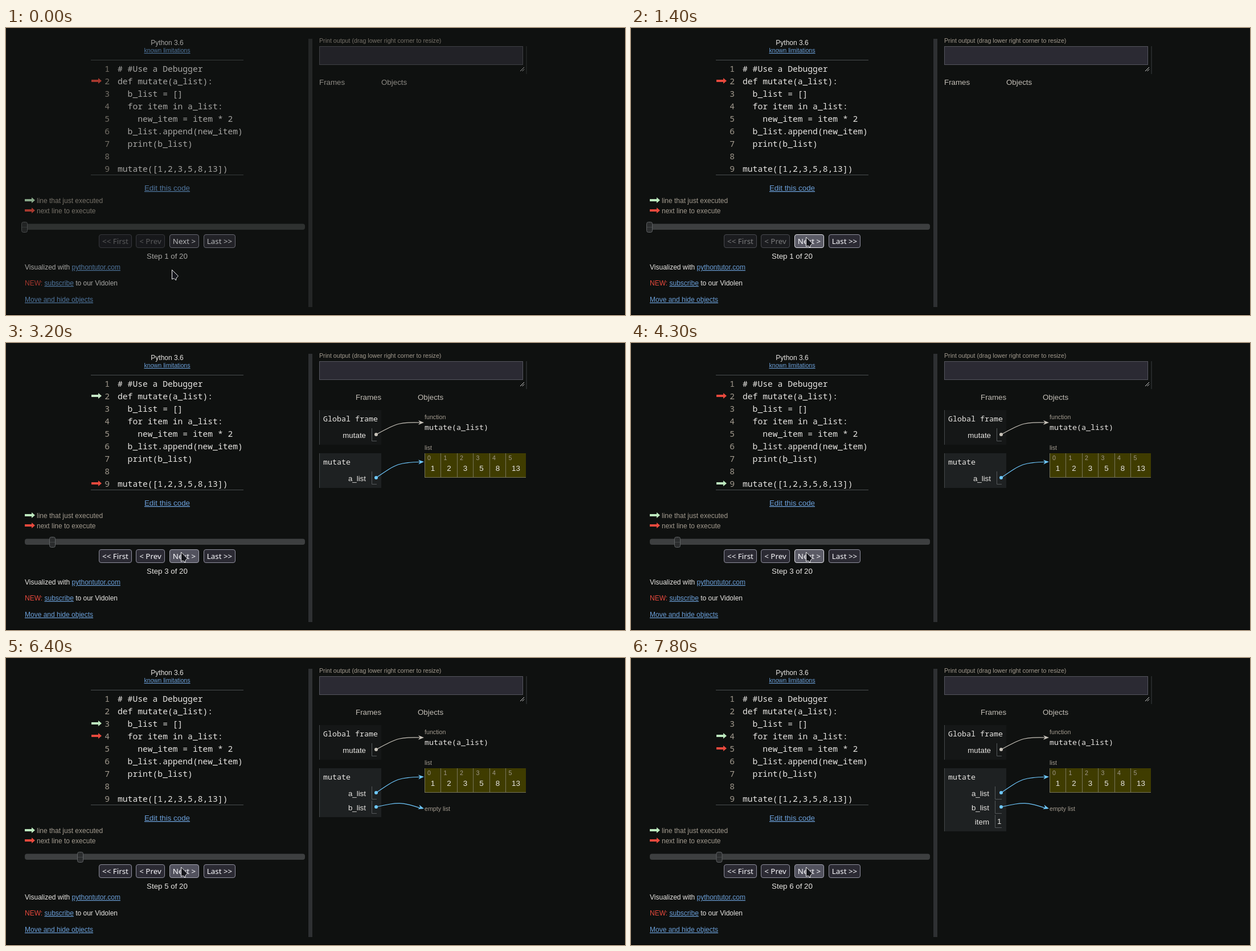
Write an HTML page that moves like this. It is 1087x505 px and loops after 8 s.

```html
<!DOCTYPE html>
<html lang="en">
<head>
<meta charset="utf-8">
<title>Stepping through code</title>
<style>
  html, body { margin: 0; width: 100%; height: 100%; overflow: hidden; background: #0f1110; }
  svg { display: block; }
  text { font: 13.333px "Liberation Sans", Arial, sans-serif; fill: #e8e6e3; white-space: pre; }
  .code { font: 14.667px "Noto Sans Mono", monospace; }
  .mono { font: 13.333px "Noto Sans Mono", monospace; }
  .ui { font: 13.333px "Noto Sans", sans-serif; fill: #fbfbfe; }
  .s { font-size: 12px; }
  .xs { font-size: 10.667px; }
  .soft { fill: #a39b8f; }
  .head { fill: #c3beb6; }
  .link { fill: #6b9fd8; text-decoration: underline; }
  .mid { text-anchor: middle; }
  .end { text-anchor: end; }
</style>
</head>
<body>
<svg id="stage" width="1087" height="505" viewBox="0 0 1087 505"></svg>
<script>
const LOOP = 8000, TICK = 100;
const RED = '#e8493d', GREEN = [188, 232, 190], WHITE = [232, 230, 227];
const BLUE = '#6fc9ff', GREY = '#c8c3ba', EDGE = '#55595b';

const CODE = ['# #Use a Debugger', 'def mutate(a_list):', '  b_list = []',
  '  for item in a_list:', '    new_item = item * 2', '  b_list.append(new_item)',
  '  print(b_list)', '', 'mutate([1,2,3,5,8,13])'];

// Each step: when it shows, when its arrows start, the line just run, the next line.
const STEPS = [
  { at: 0, move: -1000, prev: 0, next: 2 },
  { at: 1500, move: 1530, prev: 2, next: 9 },
  { at: 3200, move: 3150, prev: 9, next: 2 },
  { at: 4500, move: 4530, prev: 2, next: 3 },
  { at: 6000, move: 5950, prev: 3, next: 4 },
  { at: 7400, move: 7350, prev: 4, next: 5 }
];
const PRESSES = [1300, 3000, 4300, 5800, 7200];

const clamp = v => Math.max(0, Math.min(1, v));
const cubic = k => k < .5 ? 4 * k ** 3 : 1 - 4 * (1 - k) ** 3;
const mix = (a, b, k) => a + (b - a) * k;
const esc = s => String(s).replace(/&/g, '&amp;').replace(/</g, '&lt;');

const text = (x, y, s, cls = '') => `<text x="${x}" y="${y}" class="${cls}">${esc(s)}</text>`;
const span = (s, cls) => `<tspan class="${cls}">${s}</tspan>`;
const rect = (x, y, w, h, fill, more = '') =>
  `<rect x="${x}" y="${y}" width="${w}" height="${h}" fill="${fill}" ${more}/>`;
const line = (d, color = EDGE) => `<path d="${d}" fill="none" stroke="${color}"/>`;
const pointer = (x, y, fill) =>
  `<polygon points="0,3 12,3 12,0 18,5 12,10 12,7 0,7" transform="translate(${x} ${y})" fill="${fill}"/>`;
const rgb = c => `rgb(${c.map(Math.round)})`;
const rowY = n => 66 + 22 * (n - 1);

function button(x, w, label, state) {
  const fill = { hover: '#52525e', press: '#5b5b66' }[state] || '#2b2a33';
  const edge = state === 'press' ? '#e4e4ea' : state === 'hover' ? '#a3a3b0' : '#8f8f9d';
  return `<g opacity="${state === 'off' ? .45 : 1}">` +
    rect(x + .5, 363.5, w - 1, 23, fill, `rx="3.5" stroke="${edge}"`) +
    text(x + w / 2, 380, label, 'ui mid') + '</g>';
}

function leftPane(t, step, hover, press) {
  const { prev, next, move } = STEPS[step];
  let out = text(283, 30, 'Python 3.6', 's mid') + text(283, 43, 'known limitations', 'xs link mid') +
    line('M149 56.5H417M149 258.5H417', '#4a4e50');
  CODE.forEach((s, i) => {
    out += text(182, 77 + 22 * i, i + 1, 'code soft end') + text(196, 77 + 22 * i, s, 'code');
  });

  // The old arrow whitens, then jumps; the next-line arrow slides after it.
  const jumped = t >= move + 200;
  const shown = jumped ? prev : step && STEPS[step - 1].prev;
  const white = jumped ? 0 : clamp((t - move) / 200);
  if (shown) out += pointer(150, rowY(shown), rgb(GREEN.map((c, i) => mix(c, WHITE[i], white))));
  const from = step ? STEPS[step - 1].next : next;
  out += pointer(150, mix(rowY(from), rowY(next), cubic(clamp((t - move - 200) / 250))), RED);

  out += text(283, 286, 'Edit this code', 'link mid') +
    pointer(33, 298, rgb(GREEN)) + text(54, 308, 'line that just executed', 's soft') +
    pointer(33, 316, RED) + text(54, 326, 'next line to execute', 's soft');

  const knob = 27 + 24.5 * step;
  out += rect(33, 344.5, 492, 10.5, '#3d3f40', 'rx="4"') +
    rect(knob + .5, 341.5, 10, 18, '#2b2d2e', 'rx="3" stroke="#606365"') +
    line(`M${knob + 1} 350.5h9`, '#46494a');

  const back = step ? '' : 'off';
  out += button(163, 58, '<< First', back) + button(228, 51, '< Prev', back) +
    button(287, 52, 'Next >', press ? 'press' : hover ? 'hover' : '') + button(347, 56, 'Last >>', '') +
    text(283, 406, `Step ${step + 1} of 20`, 'mid');

  return out +
    `<text x="33" y="425" class="s">Visualized with ${span('pythontutor.com', 's link')}</text>` +
    `<text x="33" y="453" class="s"><tspan fill="${RED}">NEW:</tspan> ${span('subscribe', 's link')} to our Vidolen</text>` +
    text(33, 482, 'Move and hide objects', 's link');
}

function frameBox(y, h, title, active) {
  return rect(550, y, 109, h, active ? '#1e2122' : '#151717') + line(`M550.5 ${y}v${h}`, '#44484a') +
    text(557, y + 20, title, 'mono');
}

function variable(y, name, cell = 642, value = '') {
  return text(cell - 10, y, name, 'end') + line(`M${cell + .5} ${y - 17}v22.5H651`) + text(643, y - 1, value);
}

// Curved reference from a variable to its object.
function link(y0, cx, cy, y1, color) {
  const angle = Math.atan2(y1 - cy, 733 - cx) * 180 / Math.PI;
  return `<circle cx="650" cy="${y0}" r="3" fill="${color}"/>` +
    `<path d="M650 ${y0}C${cx} ${cy} ${cx} ${cy} 731 ${y1}" fill="none" stroke="${color}" stroke-width="1.2"/>` +
    `<path d="M0 0-10-4-7 0-10 4Z" transform="translate(734 ${y1}) rotate(${angle})" fill="${color}"/>`;
}

function list() {
  let out = text(735, 188, 'list', 'xs soft') + rect(735, 194, 178, 43, '#3f3c00');
  [1, 2, 3, 5, 8, 13].forEach((v, i) => {
    const x = 735 + 28.5 * i;
    out += line(`M${Math.floor(x) + .5} 194v43`, '#77755a') +
      text(x + 5, 206, i, 'xs soft') + text(i < 5 ? x + 14.5 : 895.5, 225, v, 'mid');
  });
  return out + line('M735 236.5H913', '#77755a');
}

function rightPane(step) {
  const shift = step ? 64 : 0;
  let out = text(550, 26, 'Print output (drag lower right corner to resize)', 'xs soft') +
    rect(550.5, 32.5, 357, 32, '#2b2a33', 'stroke="#55555e"') +
    line('M903 76l7-7M906.500 76l3.500-3.500', '#d8d8d8') +
    rect(913, 32, 2, 49, '#242728') +
    text(550 + shift, 100, 'Frames', 'head') + text(659 + shift, 100, 'Objects', 'head');
  if (step >= 1) {
    out += frameBox(118, 61, 'Global frame', step === 1) + variable(167, 'mutate') +
      text(735, 134, 'function', 'xs soft') + text(735, 153, 'mutate(a_list)', 'mono') +
      link(161, 690, 139.5, 140, step === 1 ? BLUE : GREY);
  }
  if (step >= 2) {
    const cell = step >= 5 ? 639 : 642;
    out += frameBox(194, step >= 5 ? 111 : step >= 4 ? 86 : 61, 'mutate', true) +
      variable(243, 'a_list', cell) + list() + link(237, 688, 211, 209, BLUE);
    if (step >= 4) out += variable(268, 'b_list', cell) + text(735, 269, 'empty list', 'xs soft') +
      link(262, 692, 253, 265, BLUE);
    if (step >= 5) out += variable(293, 'item', cell, '1');
  }
  return out;
}

function scene(t) {
  const step = STEPS.filter(s => s.at <= t).length - 1;
  const press = PRESSES.some((p, i) => t >= p && t < STEPS[i + 1].at);
  const k = cubic(clamp((t - 100) / 500));
  const x = mix(291, 307, k), y = mix(425, 367.5, k);
  const light = t < 1300 ? .7 : t < 1400 ? .85 : 1;
  return rect(0, 0, 1087, 505, '#0f1110') + rect(0, 504, 1087, 1, '#000') +
    `<g opacity="${light}">` + rect(531, 19, 7, 472, '#2e3032') +
    leftPane(t, step, y < 387, press) + rightPane(step) + '</g>' +
    `<path d="M.5.5 11.5 11.500 8 15 7.500 19 4 15.500.5 17Z" transform="translate(${x} ${y})" ` +
    'fill="#15161c" stroke="#f2f2f4" stroke-linejoin="round"/>';
}

const stage = document.getElementById('stage');
let shownTick = -1;
function draw(now) {
  const t = Math.floor(now % LOOP / TICK) * TICK;
  if (t !== shownTick) stage.innerHTML = scene(shownTick = t);
  requestAnimationFrame(draw);
}
draw(performance.now());
</script>
</body>
</html>
```
